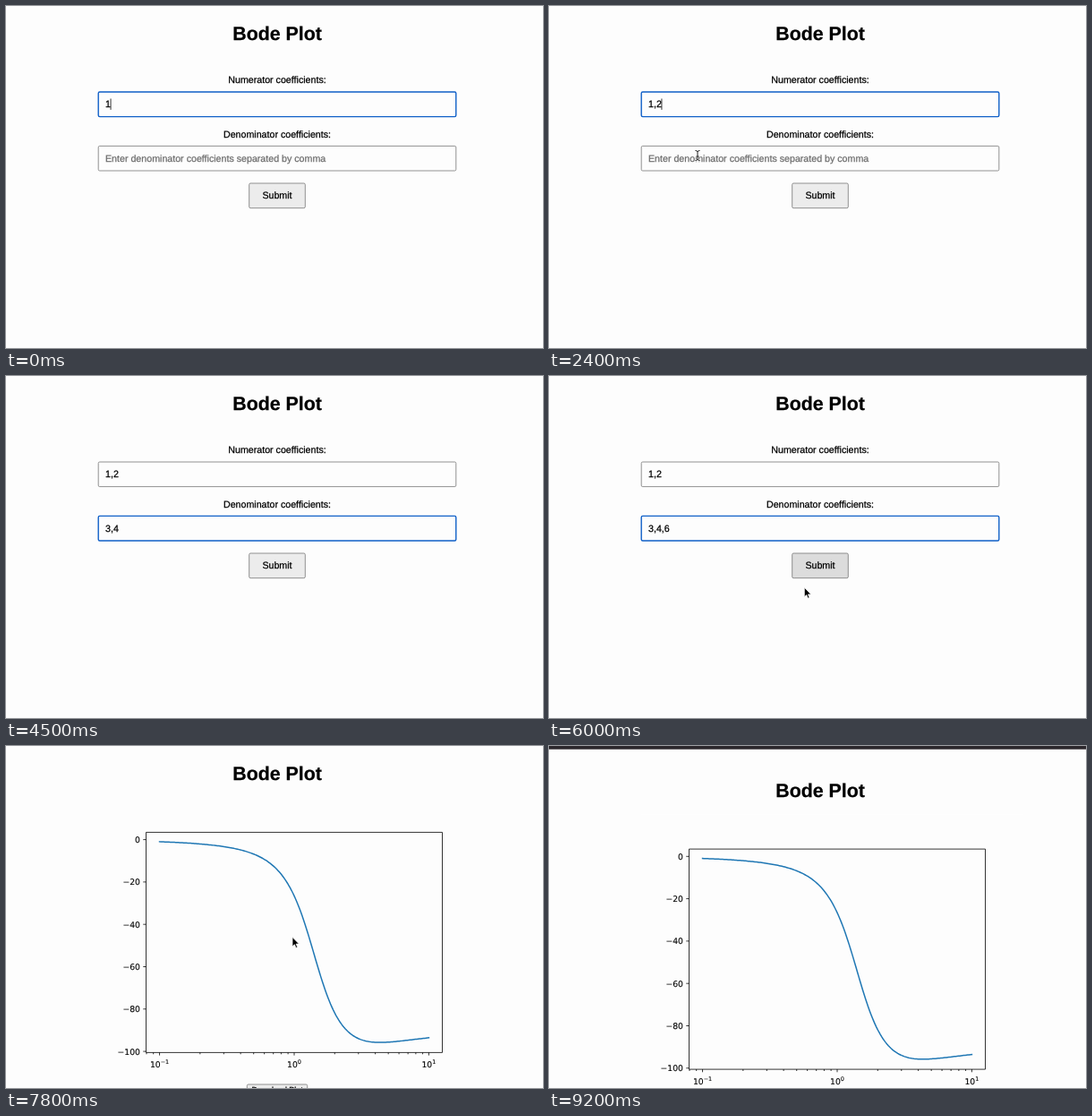
Animation of 600 by 382 pixels, one loop 9.9 s. Source, as an HTML page:

```html
<!DOCTYPE html>
<html lang="en">
<head>
<meta charset="utf-8">
<title>Bode Plot</title>
<style>
  html, body { margin: 0; width: 100%; height: 100%; overflow: hidden; background: #fdfdfd; }
  svg { display: block; width: 600px; height: 382px; }
  text { font: 10.667px "Liberation Sans", Arial, sans-serif; text-rendering: geometricPrecision; white-space: pre; stroke: #000; stroke-width: .25; }
  .mid { text-anchor: middle; }
  .title { font-size: 21.333px; font-weight: bold; }
  .small { font-size: 8.889px; }
  .hint { fill: #6c6c6c; stroke: #6c6c6c; }
  .field { fill: #fdfdfd; stroke: #767676; stroke-width: .8; }
  .field.focus { stroke: #1060c8; stroke-width: 1.4; }
  .button { fill: #ececec; stroke: #767676; stroke-width: .8; }
  .caret { stroke: #000; stroke-width: .8; }
  .axis { fill: none; stroke: #000; stroke-width: .8; }
  .curve { fill: none; stroke: #1f77b4; stroke-width: 1.5; stroke-linecap: square; }
  #plot .tick { font: 9.26px "DejaVu Sans", sans-serif; stroke-width: .1; }
  #plot .sup { font-size: 6.48px; }
</style>
</head>
<body>
<svg viewBox="0 0 600 382">
  <g id="page">
    <rect y="-60" width="600" height="45" fill="#2a262b"/>
    <text class="mid title" x="303" y="38">Bode Plot</text>
    <g id="form">
      <text class="mid" x="303" y="86.3">Numerator coefficients:</text>
      <rect class="field" x="103.2" y="96" width="399.6" height="27.6" rx="1.5"/>
      <text class="value" x="111" y="113.2"></text>
      <text class="mid" x="303" y="146.6">Denominator coefficients:</text>
      <rect class="field" x="103.2" y="156.4" width="399.6" height="27.6" rx="1.5"/>
      <text class="value" x="111" y="173.7"></text>
      <path class="caret" id="caret"/>
      <rect class="button" id="submit" x="271.7" y="198" width="62.6" height="27.7" rx="1.5"/>
      <text class="mid" x="303" y="215.2">Submit</text>
    </g>
    <g id="plot">
      <rect x="103" y="58" width="427" height="320" fill="#fdfdfd"/>
      <rect class="button" x="269.3" y="378" width="67.4" height="14" rx="1.5"/>
      <text class="mid small" x="303" y="387">Download Plot</text>
    </g>
  </g>
  <path id="arrow" d="M0 0v10.4l2.4-2.2 1.6 3.7 1.7-.7-1.6-3.6h3.3z" stroke="#fff" stroke-width=".7"/>
  <g id="beam" fill="none">
    <path d="M-2.5-5.5Q0-5.5 0-4Q0-5.5 2.5-5.5M0-4V4M-1.5 1h3M-2.5 5.5Q0 5.5 0 4Q0 5.5 2.5 5.5" stroke="#fff" stroke-width="2.4"/>
    <path d="M-2.5-5.5Q0-5.5 0-4Q0-5.5 2.5-5.5M0-4V4M-1.5 1h3M-2.5 5.5Q0 5.5 0 4Q0 5.5 2.5 5.5" stroke="#222"/>
  </g>
  <circle id="ring" r="10.8" fill="none" stroke="#111" stroke-width="1.2"/>
</svg>
<script>
const $ = id => document.getElementById(id);
const fields = document.querySelectorAll('.field');
const values = document.querySelectorAll('.value');
const LOOP = 9900, STEP = 100;
const HINT = 'Enter denominator coefficients separated by comma';

// Text of each field from the given time on
const typed = [
  [[0, '1'], [100, '1,'], [1100, '1,2']],
  [[0, ''], [3400, '3'], [3700, '3,'], [3900, '3,4'], [4900, '3,4,'], [5100, '3,4,6']]
];
const caretOff = [[700, 1100], [1600, 2100], [3200, 3400], [4500, 4900], [5600, 6100]];

const within = (t, a, b) => t >= a && t < b;
const show = (el, on) => el.setAttribute('visibility', on ? 'visible' : 'hidden');
const place = (el, x, y) => el.setAttribute('transform', `translate(${x} ${y})`);
const progress = (t, a, b) => Math.min(1, Math.max(0, (t - a) / (b - a)));
const mix = (a, b, u) => a + (b - a) * u;
const bend = (a, b, c, u) => mix(mix(a, b, u), mix(b, c, u), u);
const textWidth = s => [...s].reduce((w, c) => w + (c === ',' ? 2.965 : 5.932), 0);

function buildPlot() {
  const px = lg => 322 + 150.45 * lg;
  const py = deg => 104.6 - 2.365 * deg;
  const left = 156.5, right = 487.5, top = 96.4, bottom = 342.4;
  let axis = `M${left} ${top}H${right}V${bottom}H${left}Z`, labels = '', curve = '';

  for (let deg = 0; deg >= -100; deg -= 20) {
    axis += `M${left} ${py(deg)}h-3.2`;
    labels += `<text class="tick" text-anchor="end" x="150" y="${py(deg) + 3.5}">${deg ? '\u2212' + -deg : 0}</text>`;
  }
  for (let e = -2; e <= 1; e++) {
    for (let k = 1; k < 10; k++) {
      const lg = e + Math.log10(k);
      if (Math.abs(lg) < 1.1) axis += `M${px(lg)} ${bottom}v${k === 1 ? 3.2 : 1.9}`;
    }
    if (e > -2) labels += `<text class="tick mid" x="${px(e)}" y="359">10<tspan class="sup" dy="-3.6">${e < 0 ? '\u22121' : e}</tspan></text>`;
  }
  // Phase of (s + 2) / (3s² + 4s + 6)
  for (let i = 0; i <= 200; i++) {
    const lg = i / 100 - 1, w = 10 ** lg;
    const phase = (Math.atan(w / 2) - Math.atan2(4 * w, 6 - 3 * w * w)) * 180 / Math.PI;
    curve += `${i ? 'L' : 'M'}${px(lg)} ${py(phase)}`;
  }
  $('plot').insertAdjacentHTML('beforeend',
    `<path class="curve" d="${curve}"/><path class="axis" d="${axis}"/>${labels}`);
}

function drawForm(t) {
  const active = t < 2600 ? 0 : t < 6600 ? 1 : -1;
  const texts = typed.map(keys => keys.filter(k => k[0] <= t).pop()[1]);
  texts.forEach((s, i) => {
    values[i].textContent = s || HINT;
    values[i].classList.toggle('hint', !s);
    fields[i].classList.toggle('focus', i === active);
  });
  const caretOn = active >= 0 && !caretOff.some(([a, b]) => within(t, a, b));
  show($('caret'), caretOn);
  if (caretOn) $('caret').setAttribute('d', `M${111.1 + textWidth(texts[active])} ${active ? 164 : 103.5}v12.4`);
  $('submit').style.fill = t >= 6000 ? '#dcdcdc' : '#ececec';
}

function drawPointer(t) {
  show($('beam'), within(t, 2200, 3400));
  const u = progress(t, 2200, 2600);
  place($('beam'), mix(190, 142, u), mix(162, 172, u));

  show($('arrow'), within(t, 5600, 8300));
  if (t < 7800) {
    const v = progress(t, 5600, 6100);
    place($('arrow'), bend(142, 240, 317, v), bend(172, 285, 216, v));
  } else {
    const v = progress(t, 7800, 8200);
    place($('arrow'), mix(320, 567, v), mix(213.5, 51, v));
  }

  show($('ring'), within(t, 2600, 2800) || within(t, 6600, 6800));
  place($('ring'), ...(t < 5000 ? [141.8, 171.7] : [319, 220.5]));
}

function frame(now) {
  const t = Math.floor(now % LOOP / STEP) * STEP;
  const result = t >= 7000;
  show($('form'), !result);
  show($('plot'), result);
  drawForm(t);
  drawPointer(t);
  const pull = progress(t, 8900, 9200);
  place($('page'), 0, 18.7 * pull * (2 - pull));
  requestAnimationFrame(ms => frame(Math.max(0, ms - start)));
}

buildPlot();
const start = performance.now();
frame(0);
</script>
</body>
</html>
```
